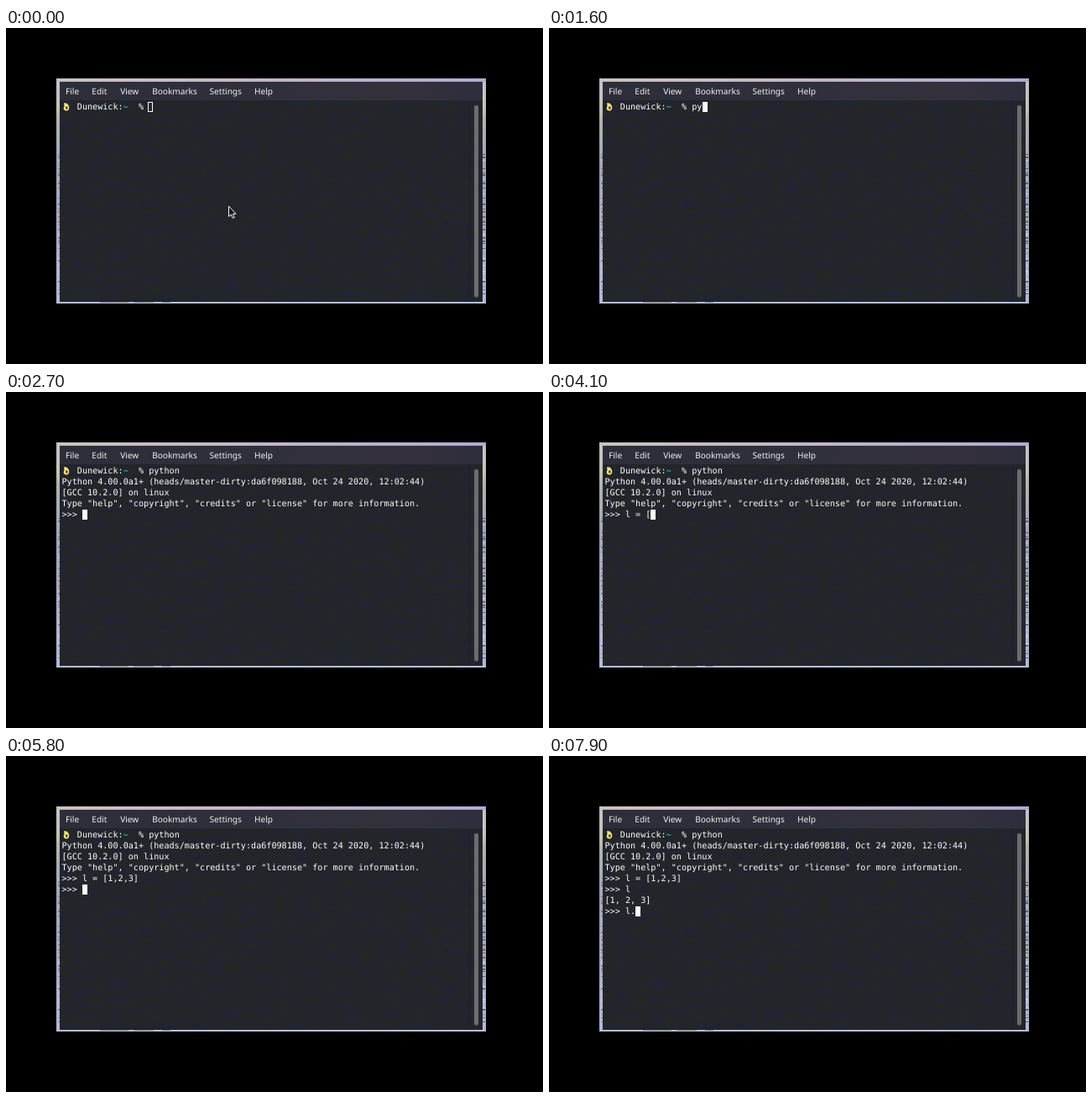
Write an HTML page that moves like this. It is 640 px wide and 400 px high and loops after 8000 ms.

```html
<!DOCTYPE html>
<html lang="en">
<head>
<meta charset="utf-8">
<title>Terminal session</title>
<style>
  html, body { margin: 0; width: 100%; height: 100%; overflow: hidden; background: #000; }
  svg { display: block; width: 640px; height: 400px; }
  text { white-space: pre; text-rendering: geometricPrecision; }
  .menu { font: 10.1px "Noto Sans", "Open Sans", sans-serif; fill: #f0f0f0; }
  .term { font: 10.15px "DejaVu Sans Mono", monospace; fill: #fff; }
</style>
</head>
<body>
<svg viewBox="0 0 640 400">
  <defs>
    <filter id="water" x="0" y="0" width="1" height="1" color-interpolation-filters="sRGB">
      <feTurbulence type="fractalNoise" baseFrequency=".05 .2" numOctaves="3" seed="7"/>
      <feColorMatrix values="-.03 0 0 0 .152  -.03 0 0 0 .16  .14 0 0 0 .1  0 0 0 0 1"/>
    </filter>
    <linearGradient id="bar">
      <stop offset="0" stop-color="#2e2e3a"/>
      <stop offset=".5" stop-color="#30303c"/>
      <stop offset=".85" stop-color="#34303c"/>
      <stop offset="1" stop-color="#2e2e3e"/>
    </linearGradient>
    <linearGradient id="side" x2="0" y2="1">
      <stop offset="0" stop-color="#c4c0d0"/>
      <stop offset=".13" stop-color="#c4c4b4"/>
      <stop offset=".18" stop-color="#b0b4ac"/>
      <stop offset=".4" stop-color="#a4a4b8"/>
      <stop offset="1" stop-color="#b4b8d8"/>
    </linearGradient>
    <linearGradient id="edge">
      <stop offset="0" stop-color="#c8c4bc"/>
      <stop offset=".4" stop-color="#c4b8c4"/>
      <stop offset="1" stop-color="#b0acd0"/>
    </linearGradient>
  </defs>

  <rect width="640" height="400"/>
  <rect x="60" y="60" width="512" height="268" fill="url(#side)"/>
  <g id="streaks"></g>
  <rect x="60" y="60" width="512" height="4" fill="url(#edge)"/>
  <rect x="60" y="326" width="512" height="2" fill="#b4c0d8"/>
  <path d="M112 326.5h34m6 0h24m10 0h10" stroke="#7c8884"/>
  <rect x="64" y="86" width="504" height="240" filter="url(#water)"/>
  <path d="M552.5 86v240" stroke="#1c1c28" opacity=".5"/>
  <rect x="64" y="64" width="504" height="22" fill="url(#bar)"/>
  <rect x="558" y="92" width="5" height="228.5" rx="2" fill="#6c6c70"/>

  <g class="menu">
    <text x="71" y="79">File</text>
    <text x="102.3" y="79">Edit</text>
    <text x="136.2" y="79">View</text>
    <text x="174.2" y="79">Bookmarks</text>
    <text x="242.5" y="79">Settings</text>
    <text x="296" y="79">Help</text>
  </g>

  <g>
    <path d="M69 89.5c2-.5 4 0 5.500 2.500 2 3.500 0 7-3 6.500-3-.5-3.500-3-2-5.500z" fill="#f0e07c"/>
    <ellipse cx="72.300" cy="95" rx="1.200" ry="1.800" fill="#30300c"/>
  </g>
  <g id="lines" class="term"></g>
  <rect id="caret" width="6" height="12"/>
  <path id="arrow" d="M265.5 212v12.5l2.8-2.5 2 4.5 2-1-2-4.2h3.7z" fill="#181820" stroke="#f4f4f4"/>
  <g id="beam" fill="none">
    <path d="M-3-6h2l1 1 1-1h2M-3 6h2l1-1 1 1h2M0-5V5" stroke="#f0f0f0" stroke-width="2.8"/>
    <path d="M-3-6h2l1 1 1-1h2M-3 6h2l1-1 1 1h2M0-5V5" stroke="#202028"/>
  </g>
</svg>
<script>
const LOOP = 8000, LEFT = 66.5, CELL = 6.11, ROW = 13, BASE = 97;
const $ = id => document.getElementById(id);

const prompt = '   Dunewick:<tspan fill="#1cbcb4" font-weight="bold">~</tspan>  % ';
const banner = [
  'Python 4.00.0a1+ (heads/master-dirty:da6f098188, Oct 24 2020, 12:02:44)',
  '[GCC 10.2.0] on linux',
  'Type "help", "copyright", "credits" or "license" for more information.'
];

// Each entry: a time and the text typed by then.
const command = [[1300, 'p'], [1600, 'py'], [1700, 'pyt'], [1800, 'pyth'], [1900, 'python']];
const assign = [[3500, 'l'], [3600, 'l '], [3700, 'l ='], [3900, 'l = '], [4100, 'l = ['],
  [4300, 'l = [1'], [4400, 'l = [1,'], [4500, 'l = [1,2'], [4700, 'l = [1,2,'],
  [4900, 'l = [1,2,3'], [5400, 'l = [1,2,3]']];
const show = [[6100, 'l']];
const method = [[7700, 'l'], [7900, 'l.']];

const typed = (steps, t) => steps.reduce((text, [at, value]) => t >= at ? value : text, '');
const escape = s => s.replace(/>/g, '&gt;');

function screen(t) {
  const rows = [prompt + typed(command, t)];
  const ask = steps => rows.push(escape('>>> ' + typed(steps, t)));
  if (t >= 2400 && t < 2600) rows.push('');
  if (t >= 2600) { rows.push(...banner); ask(assign); }
  if (t >= 5800) ask(show);
  if (t >= 6300) { rows.push('[1, 2, 3]'); ask(method); }
  return rows;
}

// Wallpaper ripples that show through the side borders.
function drawStreaks() {
  const colors = ['#505c84', '#a4a47c', '#c4cce8', '#60686c'];
  let seed = 11, markup = '';
  const random = () => (seed = seed * 16807 % 2147483647) / 2147483647;
  for (let y = 150; y < 322; y += 2 + Math.floor(random() * 6)) {
    const color = colors[Math.floor(random() * colors.length)];
    const height = 1 + Math.floor(random() * 2);
    markup += `<rect x="568" y="${y}" width="3" height="${height}" fill="${color}"/>` +
      `<rect x="62" y="${y}" width="2" height="${height}" fill="${color}" opacity=".6"/>`;
  }
  $('streaks').innerHTML = markup;
}

const toggle = (node, on) => node.setAttribute('visibility', on ? 'visible' : 'hidden');
let shown = '';

function render(t) {
  const rows = screen(t);
  const markup = rows.map((row, i) =>
    `<text x="${LEFT}" y="${BASE + i * ROW}" xml:space="preserve">${row}</text>`).join('');
  if (markup !== shown) $('lines').innerHTML = shown = markup;

  const column = $('lines').lastElementChild.textContent.length;
  const focused = t >= 100, inset = focused ? 0 : .5;
  const caret = $('caret');
  caret.setAttribute('x', Math.round(LEFT + column * CELL) + inset - (focused ? 0 : 1));
  caret.setAttribute('y', 88 + (rows.length - 1) * ROW + inset);
  caret.setAttribute('width', focused ? 6 : 5);
  caret.setAttribute('height', focused ? 12 : 11);
  caret.setAttribute('fill', focused ? '#fcfcfc' : 'none');
  caret.setAttribute('stroke', focused ? 'none' : '#fcfcfc');

  const step = Math.min(5, Math.floor(t / 100));
  toggle($('arrow'), !focused);
  toggle($('beam'), focused && t < 1300);
  $('beam').setAttribute('transform', `translate(266.5 ${212 - 4 * step})`);
}

const start = performance.now();
function tick() {
  render((performance.now() - start) % LOOP);
  requestAnimationFrame(tick);
}
drawStreaks();
render(0);
requestAnimationFrame(tick);
</script>
</body>
</html>
```
